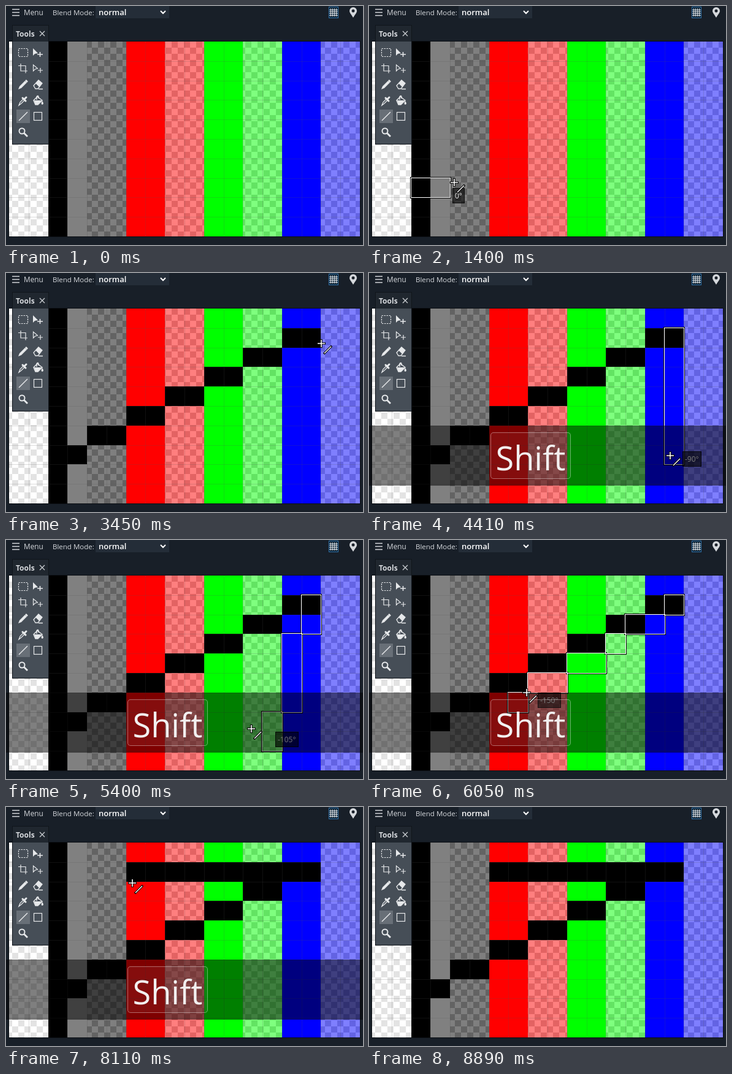
An HTML page with a canvas for the animation above (9.9 s loop, 582 by 390 pixels).

```html
<!DOCTYPE html>
<html lang="en">
<head>
<meta charset="utf-8">
<title>Line tool with angle snapping</title>
<style>
  html, body { margin: 0; width: 100%; height: 100%; overflow: hidden; background: #181f28; }
  body { position: relative; font-family: "Open Sans", "Noto Sans", sans-serif; color: #d5d8dc; }
  canvas, svg, div { position: absolute; }
  canvas, #ui { left: 0; top: 0; }
  #label {
    box-sizing: border-box; height: 25px; padding: 0 3px; border: 1px solid rgba(0, 0, 0, .75);
    background: rgba(0, 0, 0, .6); color: #eee; font-size: 12px; line-height: 23px; white-space: nowrap;
  }
  #band {
    left: 0; top: 249px; width: 582px; height: 98px; background: rgba(0, 0, 0, .5);
  }
  #key {
    box-sizing: border-box; left: 198px; top: 11px; width: 131px; height: 76px;
    border: 1px solid rgba(255, 255, 255, .38); border-radius: 5px; background: rgba(255, 255, 255, .05);
    color: #f2f0f0; font-size: 54px; line-height: 80px; text-align: center;
  }
  #cursor { left: 0; top: 0; overflow: visible; }
</style>
</head>
<body>
<canvas id="board" width="582" height="390"></canvas>
<div id="label"></div>

<svg id="ui" width="582" height="390" fill="none" stroke="#e6e8ea" stroke-width="1.5">
  <!-- header -->
  <path d="M10 5.500h12M10 10.500h12M10 15.500h12" stroke="#d5d8dc"/>
  <rect x="146" y="0" width="120" height="20" fill="#242d38" stroke="none"/>
  <path d="M252 8l4 4 4-4" stroke="#fff" stroke-width="2"/>
  <g fill="#d5d8dc" stroke="none" font-weight="500">
    <text x="29" y="15" font-size="11.8">Menu</text>
    <text x="76" y="15" font-size="11.5">Blend Mode:</text>
    <text x="151" y="15" font-size="13" font-weight="600" fill="#fff">normal</text>
  </g>
  <rect x="526.5" y="1.5" width="15" height="18" fill="#12283a" stroke="#2d6ca2" stroke-width="1"/>
  <path d="M529.5 4v13M532.5 4v13M535.5 4v13M538.5 4v13M527 6.5h14M527 9.5h14M527 12.5h14M527 15.5h14" stroke="#d8dde2" stroke-width="1"/>
  <path d="M566 19C563 14 560 11 560 8a6 6 0 0 1 12 0c0 3-3 6-6 11zM566 5.500a2.500 2.500 0 1 0 .01 0z" fill="#d5d8dc" fill-rule="evenodd" stroke="none"/>

  <!-- tool panel -->
  <rect x="10.500" y="31.500" width="59" height="194" fill="#464e57" stroke="#10151b" stroke-width="1"/>
  <rect x="11" y="32" width="58" height="26" fill="#20272f" stroke="none"/>
  <text x="16" y="50" font-size="12" font-weight="700" fill="#d5d8dc" stroke="none">Tools</text>
  <path d="M55 41l8 8M63 41l-8 8" stroke="#c8ccd0" stroke-width="1.300"/>
  <rect x="17" y="169" width="22" height="22" fill="#686f77" stroke="none"/>
  <rect x="20.5" y="69.5" width="15" height="13" stroke-width="1.2" stroke-dasharray="2.500 1.500"/>
  <path d="M44 69v12l3-3 5-1z" fill="#e6e8ea" stroke="none"/>
  <path d="M51 79h9M55.5 75v8" stroke-width="1.600"/>
  <path d="M24 94v12h11M20 97.500h12v12" stroke-width="1.200"/>
  <path d="M44.500 96v10l3-3 4-1zM52 105h8M56 101v8" stroke-width="1.200"/>
  <path d="M20 136l2-5 9-9 3 3-9 9z" fill="#e6e8ea" stroke="none"/>
  <path d="M32 121l3 3" stroke-width="2.500"/>
  <path d="M45 130l8-9 6 5-7 9h-4z" stroke-width="1.300"/>
  <path d="M48 126l6 6 5-6-6-5z" fill="#e6e8ea" stroke="none"/>
  <path d="M53 135.500h7"/>
  <path d="M21 162l2-5 6-6 2 2-6 6z" stroke-width="1.300"/>
  <path d="M27 150l5 5M30 152l3-3" stroke-width="3" stroke-linecap="round"/>
  <path d="M45 154l6-6 8 6-7 7h-4z"/>
  <path d="M46 154h12l-6 7h-4zM59 155q4 5 0 6q-3-1 0-6z" fill="#e6e8ea" stroke="none"/>
  <path d="M50 153v-5q2-3 3 0v3"/>
  <path d="M21 187l14-14"/>
  <rect x="45.500" y="173.500" width="13" height="13" stroke-width="1.200"/>
  <circle cx="26" cy="204" r="4.500" stroke-width="2"/>
  <path d="M29 207l6 6" stroke-width="2.800"/>
</svg>

<div id="band"><div id="key">Shift</div></div>

<svg id="cursor" width="1" height="1" fill="none">
  <g id="pointer">
    <path d="M-7 0h14M0 -7v14" stroke="#000" stroke-width="3.5"/>
    <path d="M-6 0h12M0 -6v12" stroke="#fff" stroke-width="1.600"/>
    <path d="M4 17L17 4" stroke="#000" stroke-width="3.400"/>
    <path d="M5 16L16 5" stroke="#fff" stroke-width="1.400"/>
  </g>
</svg>

<script>
const LOOP = 9900, COLS = 18, ROWS = 10;
const board = document.getElementById('board');
const ctx = board.getContext('2d');
const label = document.getElementById('label');
const band = document.getElementById('band');
const pointer = document.getElementById('pointer');

const edgeX = c => Math.round(5 + c * 572 / COLS);
const edgeY = r => Math.round(58 + r * 318 / ROWS);
const cellAt = ([x, y]) => [Math.floor((x - 6) * COLS / 572), Math.floor((y - 58) * ROWS / 318)];

// First column, width and paint of each stripe.
const STRIPES = [
  [0, 2, '#ffffff80'], [2, 1, '#000'], [3, 1, '#808080'], [4, 2, '#00000080'],
  [6, 2, '#f00'], [8, 2, '#ff000080'], [10, 2, '#0f0'], [12, 2, '#00ff0080'],
  [14, 2, '#00f'], [16, 2, '#0000ff80']
];

// Pointer strokes: start, step length, last step, then [step, x, y] waypoints.
const MOVES = [
  [330, 95, 8, [0, 340, 218], [5, 150, 285], [8, 85, 297]],
  [1300, 90, 4, [0, 118, 297], [1, 139, 288], [3, 440, 142], [4, 550, 104]],
  [1960, 110, 1, [0, 530, 108], [1, 522, 112]],
  [2280, 1, 0, [0, 514, 115]],
  [3870, 90, 8, [0, 512, 118], [5, 493, 291], [6, 491, 298], [8, 491, 331]],
  [5010, 93, 10, [0, 482, 329], [5, 380, 303], [10, 263, 253]],
  [6050, 95, 8, [0, 257, 249], [4, 224, 184], [8, 202, 119]],
  [8110, 130, 1, [0, 206, 124], [1, 204, 124]],
  [8400, 1, 0, [0, 252, 144]]
];

const FIRST = [2, 7], CORNER = [15, 1], LAST = [6, 1];

function along(points, step) {
  let a = points[0];
  for (const b of points) {
    if (step <= b[0]) {
      const u = b[0] > a[0] ? (step - a[0]) / (b[0] - a[0]) : 0;
      return [a[1] + (b[1] - a[1]) * u, a[2] + (b[2] - a[2]) * u];
    }
    a = b;
  }
  return a.slice(1);
}

// The line preview trails the pointer by one step while it moves.
function pointerAt(t) {
  const move = MOVES.filter(m => m[0] <= t).pop();
  if (!move || t >= 8510) return null;
  const [start, length, last, ...points] = move;
  const step = Math.min(last, Math.floor((t - start) / length));
  const trail = step === last ? step : Math.max(0, step - 1);
  return { now: along(points, step), lagged: along(points, trail) };
}

function snap(from, to) {
  const dx = to[0] - from[0], dy = to[1] - from[1];
  const angle = Math.round(Math.atan2(dy, dx) * 12 / Math.PI) * 15;
  const rad = angle * Math.PI / 180;
  const end = Math.abs(Math.cos(rad)) >= Math.abs(Math.sin(rad))
    ? [to[0], from[1] + Math.round(dx * Math.tan(rad))]
    : [from[0] + Math.round(dy / Math.tan(rad)), to[1]];
  return { end, angle: -angle };
}

// Straight runs [x, y, w, h] making up a pixel line.
function runs(from, to) {
  const d = [to[0] - from[0], to[1] - from[1]];
  const main = Math.abs(d[0]) >= Math.abs(d[1]) ? 0 : 1, side = 1 - main;
  const n = Math.abs(d[main]), list = [];
  for (let i = 0; i <= n; i++) {
    const p = [];
    p[main] = from[main] + Math.sign(d[main]) * i;
    p[side] = from[side] + Math.sign(d[side]) * Math.round(n ? Math.abs(d[side]) * i / n : 0);
    const run = list[list.length - 1];
    if (run && run[side] === p[side]) {
      run[main] = Math.min(run[main], p[main]);
      run[main + 2] = Math.max(run[main + 2], p[main]);
    } else list.push([...p, ...p]);
  }
  return list.map(([c0, r0, c1, r1]) => {
    const x = edgeX(c0), y = edgeY(r0);
    return [x, y, edgeX(c1 + 1) - x, edgeY(r1 + 1) - y];
  });
}

function fillLine(from, to) {
  ctx.fillStyle = '#000';
  for (const r of runs(from, to)) ctx.fillRect(...r);
}

// White frame with a black one just outside it.
function outline(from, to) {
  const boxes = runs(from, to);
  ctx.lineWidth = 1;
  for (const [color, grow] of [['#000', 1.5], ['#fff', .5]]) {
    ctx.strokeStyle = color;
    for (const [x, y, w, h] of boxes) {
      ctx.strokeRect(x - grow, y - grow, w + 2 * grow, h + 2 * grow);
    }
  }
}

function drawBoard(t) {
  ctx.clearRect(0, 0, 582, 390);
  ctx.fillStyle = '#0b0f14';
  ctx.fillRect(4, 57, 574, 320);
  ctx.save();
  ctx.beginPath();
  ctx.rect(5, 58, 572, 318);
  ctx.clip();
  for (let j = 0; j < 32; j++) {
    for (let i = 0; i < 58; i++) {
      ctx.fillStyle = (i + j) % 2 ? '#c8c8c8' : '#fff';
      ctx.fillRect(i * 10, 58 + j * 10, 10, 10);
    }
  }
  for (const [col, span, color] of STRIPES) {
    ctx.fillStyle = color;
    ctx.fillRect(edgeX(col), 58, edgeX(col + span) - edgeX(col), 318);
  }
  if (t >= 3450) fillLine(FIRST, CORNER);
  if (t >= 7910) fillLine(CORNER, LAST);
  ctx.fillStyle = 'rgba(80, 80, 80, .2)';
  for (let c = 1; c < COLS; c++) ctx.fillRect(edgeX(c), 58, 1, 318);
  for (let r = 1; r < ROWS; r++) ctx.fillRect(5, edgeY(r), 572, 1);
  ctx.restore();
}

function previewAt(t, spot) {
  const cell = cellAt(spot);
  if (t >= 1090 && t < 3450) {
    const angle = -Math.atan2(cell[1] - FIRST[1], cell[0] - FIRST[0]) * 180 / Math.PI;
    return { from: FIRST, end: cell, angle: Math.round(angle) };
  }
  if (t >= 3870 && t < 7910) return { from: CORNER, ...snap(CORNER, cell) };
  return null;
}

function render(t) {
  const spot = pointerAt(t);
  const line = spot && previewAt(t, spot.lagged);
  drawBoard(t);
  if (line) {
    outline(line.from, line.end);
    label.textContent = `${line.angle}°`;
    label.style.left = `${Math.round(spot.lagged[0]) + 18}px`;
    label.style.top = `${Math.round(spot.lagged[1])}px`;
  }
  label.style.display = line ? '' : 'none';
  band.style.display = t >= 3870 && t < 8890 ? '' : 'none';
  pointer.style.display = spot ? '' : 'none';
  if (spot) {
    const [x, y] = spot.now.map(Math.round);
    pointer.setAttribute('transform', `translate(${x} ${y})`);
  }
}

// Time advances in hundredths of a second.
function tick() {
  render(Math.round(performance.now() / 10) * 10 % LOOP);
  requestAnimationFrame(tick);
}
tick();
</script>
</body>
</html>
```
